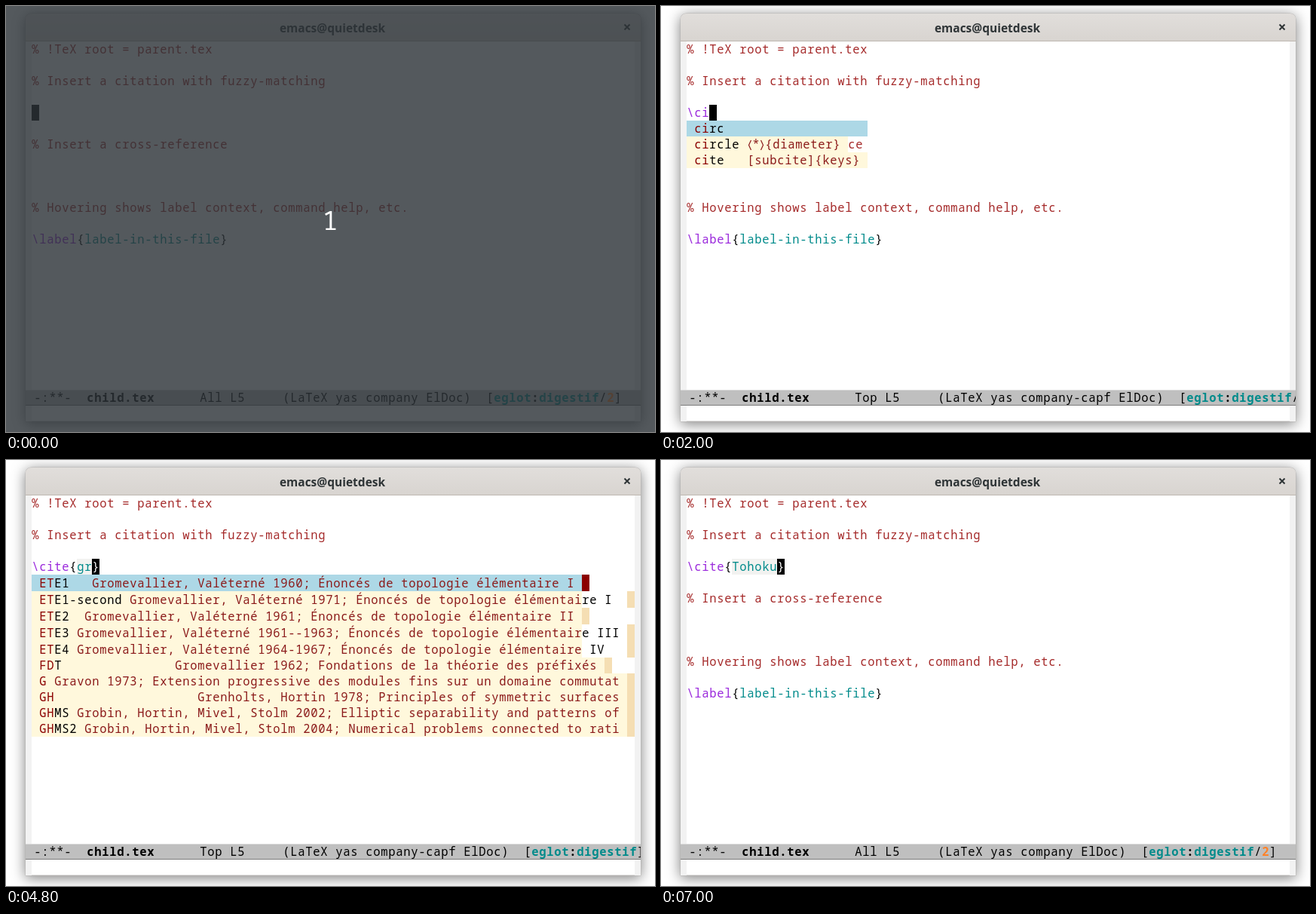
An HTML page for the animation above (8 s loop, 861 by 565 pixels).

```html
<!DOCTYPE html>
<html lang="en">
<head>
<meta charset="utf-8">
<title>Editor completion</title>
<style>
html, body { margin: 0; width: 861px; height: 565px; overflow: hidden; background: #fff; }
svg { display: block; }
text { font: 15.5px "Noto Sans Mono", monospace; letter-spacing: calc(10px - .6em); white-space: pre; font-variant-ligatures: none; }
.b { font-weight: 700; }
.title { font: 700 15.5px "Open Sans", "Noto Sans", sans-serif; letter-spacing: 0; }
.count { font-size: 34px; letter-spacing: 0; }
.shadow { filter: drop-shadow(0 3px 9px rgba(0,0,0,.5)); }
</style>
</head>
<body>
<svg width="861" height="565" viewBox="0 0 861 565">
  <defs>
    <linearGradient id="bar" x1="0" y1="0" x2="0" y2="1">
      <stop offset="0" stop-color="#e1dedb"/><stop offset="1" stop-color="#d8d4d0"/>
    </linearGradient>
    <clipPath id="win"><rect x="26" y="10" width="816" height="541"/></clipPath>
  </defs>
  <path class="shadow" d="M26 551V18q0-8 8-8H834q8 0 8 8V551Z" fill="#fff" stroke="#b4b2b0"/>
  <path d="M26 47V18q0-8 8-8H834q8 0 8 8V47Z" fill="url(#bar)"/>
  <path d="M26 46.5H842" stroke="#bfb8b1"/>
  <text class="title" x="433" y="35" text-anchor="middle" fill="#2e3436">emacs@quietdesk</text>
  <path d="M820.5 24.5l7 7m0-7l-7 7" stroke="#2e3436" stroke-width="2"/>
  <path d="M26 47h8V551h-8ZM834 47h8V551h-8Z" fill="#f2f2f2"/>
  <g id="view" clip-path="url(#win)"></g>
  <g id="dim">
    <rect width="861" height="565" fill="#2d3338" opacity=".81"/>
    <text class="count" x="430" y="297" text-anchor="middle" fill="#fff">1</text>
  </g>
</svg>
<script>
const LOOP = 8000, CELL = 10, ROW = 21, LEFT = 34, TOP = 47;
const PAD = .35; // centres a glyph in its cell
const C = {
  ink: '#000', comment: '#a52a2a', command: '#9a28dc', arg: '#008b8b',
  common: '#8b0000', note: '#8b1a1a', tip: '#fff8dc', pick: '#add8e6',
  track: '#f5deb3', thumb: '#8b0000', field: '#f2f2f0', warn: '#ff8126'
};

// Each row: key, gap in cells, description, cells lost at the right
const person = 'Gromevallier', pair = person + ', Valéterné ';
const basics = '; Énoncés de topologie élémentaire ';
const share = person + " 1995; Exercices de partage et problèmes d'assemblage en g";
const order = person + " 1995; Exercices de coordination et problèmes d'assemblage";
const team = 'Grobin, Hortin, Mivel, Stolm ';
const broad = { thumb: [0], rows: [
  ['ETE1', 3, pair + '1960' + basics + 'I', 6],
  ['ETE1-second', 1, pair + '1971' + basics + 'I', 6],
  ['ETE2', 2, pair + '1961' + basics + 'II', 6],
  ['ETE3', 1, pair + '1961--1963' + basics + 'III', 6],
  ['ETE4', 1, pair + '1964-1967' + basics + 'IV', 6],
  ['FDT', 15, person + ' 1962; Fondations de la théorie des préfixés', 3],
  ['G', 1, 'Gravon 1973; Extension progressive des modules fins sur un domaine commutat', 0],
  ['GH', 19, 'Grenholts, Hortin 1978; Principles of symmetric surfaces', 0],
  ['GHMS', 1, team + '2002; Elliptic separability and patterns of', 0],
  ['GHMS2', 1, team + '2004; Numerical problems connected to rati', 0]
] };
const narrow = { thumb: [0, 1, 2], rows: [
  ['Tohoku', 10, person + " 1957; Sur plusieurs traits d'algèbre permanente", 1],
  ['STC2', 1, person + ' 1968; Combinaison locale des ensembles cohérents et théorèm', 3],
  ['Gr-II', 1, share + 'e', 3],
  ['Gr-V', 1, share + 'éo', 3],
  ['Gr-VI', 1, share + 'e', 3],
  ['Gr-IV', 1, order, 2],
  ['Gr-III', 1, order, 2],
  ['Gr-I', 1, share + 'éo', 3],
  ['Nolvar-' + person, 1, 'Nolvar 1996; The ' + person + ' reversal lemma via Halverfi', 0],
  ['STC4', 1, 'Astel, ' + person + ', Vordrin 1971; Theorie de codes et combinaison plane', 0]
] };

// n: matched letters, tail: what follows the server name in the mode line
const states = [
  { t: 0, line: '', tail: '/2]', dim: true },
  { t: 100, line: '', tail: '/2]' },
  { t: 1100, line: '\\' },
  { t: 1400, line: '\\c', cmd: 0, n: 1 },
  { t: 2000, line: '\\ci', cmd: 0, n: 2, tail: '/1]' },
  { t: 2600, line: '\\ci', cmd: 1, n: 2 },
  { t: 2700, line: '\\ci', cmd: 2, n: 2 },
  { t: 2900, line: '\\cite[subcite]{keys}', cur: 5 },
  { t: 3000, line: '\\cite[subcite]{keys}', cur: 5, tail: '/1]',
    echo: '\\cite[subcite]{keys}: Refer to a bibliography item.' },
  { t: 3500, line: '\\cite[subcite]{keys}', cur: 5 },
  { t: 3800, line: '\\cite{keys}', cur: 6 },
  { t: 4600, line: '\\cite{g}' },
  { t: 4700, line: '\\cite{gr}' },
  { t: 4800, line: '\\cite{gr}', list: broad, n: 2 },
  { t: 5400, line: '\\cite{gro}', list: broad, n: 3 },
  { t: 5500, line: '\\cite{groa}', list: broad, n: 4 },
  { t: 5900, line: '\\cite{groalh}', list: narrow, n: 6 },
  { t: 6400, line: '\\cite{groalho}', list: narrow, n: 7 },
  { t: 6900, line: '\\cite{Tohoku}' },
  { t: 7000, line: '\\cite{Tohoku}', tail: '/2]' }
];

const rect = (x, y, w, h, fill) =>
  `<rect x="${x}" y="${y}" width="${w}" height="${h}" fill="${fill}"/>`;
const text = (x, y, s, fill = C.ink, cls = '') =>
  s ? `<text x="${x + PAD}" y="${y}" fill="${fill}" class="${cls}">${s}</text>` : '';
const col = n => LEFT + n * CELL;
const base = row => TOP + row * ROW + 16;

// Draws [string, colour, class] pieces one after another
function run(x, y, parts) {
  let out = '';
  for (const [s, fill, cls] of parts) {
    out += text(x, y, s, fill, cls);
    x += s.length * CELL;
  }
  return out;
}

function page() {
  const notes = [[0, '% !TeX root = parent.tex'], [2, '% Insert a citation with fuzzy-matching'],
    [6, '% Insert a cross-reference'], [10, '% Hovering shows label context, command help, etc.']];
  return notes.map(([row, s]) => text(LEFT, base(row), s, C.comment)).join('') +
    run(LEFT, base(12), [['\\label', C.command], ['{', C.ink], ['label-in-this-file', C.arg], ['}', C.ink]]);
}

function editLine({ line, cur }) {
  const y = TOP + 4 * ROW;
  const [, cmd, opt = '', open = '', arg = '', close = ''] =
    line.match(/^(\\?\w*)(\[\w+\])?(\{)?(\w*)(\})?$/);
  const at = cur ?? line.length - close.length;
  const field = opt || arg;
  const from = cmd.length + (opt ? 0 : open.length);
  return (open ? rect(col(from), y, field.length * CELL, ROW, C.field) : '') +
    run(LEFT, base(4), [[cmd, cmd.length > 1 ? C.command : C.ink], [opt, C.ink],
      [open, C.ink], [arg, C.arg], [close, C.ink]]) +
    rect(col(at), y, CELL, ROW, '#000') + text(col(at), base(4), line[at], '#fff');
}

function commandMenu(pick, n) {
  const rows = [['circ', 240], ['circle', 214], ['cite', 240]];
  let out = rect(LEFT, 152, 260, 63, '#fff');
  rows.forEach(([key, w], i) => {
    out += rect(LEFT, 152 + i * ROW, w, ROW, i === pick ? C.pick : C.tip) +
      run(col(1), base(5 + i), [[key.slice(0, n), C.common], [key.slice(n), C.ink]]);
  });
  const y = base(6);
  return out +
    `<path d="M119.5 ${y - 11}l-3 6.5 3 6.5M132.5 ${y - 11}l3 6.5-3 6.5" fill="none" stroke="${C.note}" stroke-width="1.2"/>` +
    text(121, y, '*', C.note) + text(138, y, '{diameter}', C.note) + text(248, y, 'ce', C.comment) +
    text(col(8), base(7), '[subcite]{keys}', C.note);
}

function citeMenu({ rows, thumb }, n) {
  let y = 152, out = '';
  rows.forEach(([key, gap, about, lost], i) => {
    const tall = about.includes('É') ? 1 : 0, h = ROW + tall;
    const edge = 79 - lost, start = 1 + key.length + gap;
    const bar = start + about.length < edge ? edge : 79;
    const cut = edge - start;
    out += rect(LEFT, y, 800, h, '#fff') +
      rect(LEFT, y, edge * CELL, h, i ? C.tip : C.pick) +
      rect(col(bar), y, CELL, h, thumb.includes(i) ? C.thumb : C.track) +
      run(col(1), y + 16 + tall, [[key.slice(0, n), C.common], [key.slice(n), C.ink]]) +
      run(col(start), y + 16 + tall, [[about.slice(0, cut), C.note], [about.slice(cut), C.ink]]);
    y += h;
  });
  return out;
}

function modeLine(active, tail = ']') {
  const count = tail.length > 1 ? [['/', C.ink], [tail[1], C.warn, 'b'], [']', C.ink]] : [[']', C.ink]];
  const mode = `(LaTeX yas company${active ? '-capf' : ''} ElDoc)  [`;
  return rect(26, 510, 816, 20, '#bfbfbf') + rect(26, 509, 816, 1, '#d9d9d9') +
    rect(26, 529, 816, 1, '#7d7d7d') +
    run(37, 525, [['-:**-  ', C.ink], ['child.tex', C.ink, 'b'],
      [`      ${active ? 'Top' : 'All'} L5     `, C.ink], [mode, C.ink],
      ['eglot', C.arg, 'b'], [':', C.ink, 'b'], ['digestif', C.arg, 'b'], ...count]);
}

const view = document.getElementById('view'), dim = document.getElementById('dim');
const begin = performance.now();
let shown;

function draw(s) {
  const command = s.cmd !== undefined;
  view.innerHTML = page() + editLine(s) +
    (command ? commandMenu(s.cmd, s.n) : '') + (s.list ? citeMenu(s.list, s.n) : '') +
    modeLine(command || s.list, s.tail) + text(LEFT, 546, s.echo);
  dim.style.display = s.dim ? '' : 'none';
}

function tick() {
  const t = (performance.now() - begin) % LOOP;
  const s = states.findLast(state => state.t <= t);
  if (s !== shown) draw(shown = s);
  requestAnimationFrame(tick);
}
tick();
</script>
</body>
</html>
```
